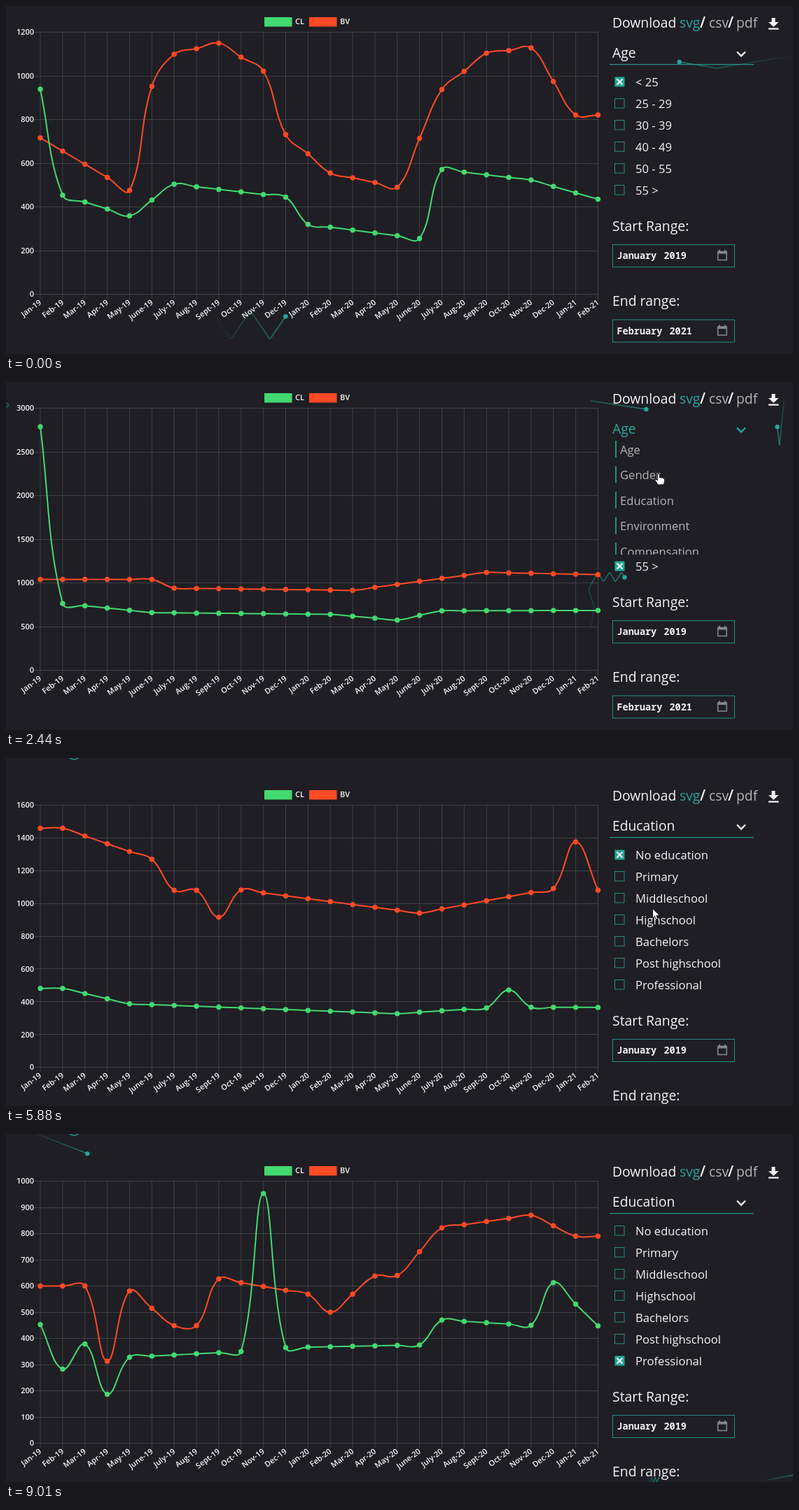
An HTML page with a canvas that plays this animation: 1124 by 498 pixels, repeating every 9.08 s.

```html
<!DOCTYPE html>
<html lang="en">
<head>
<meta charset="utf-8">
<title>Chart dashboard</title>
<style>
html, body { margin: 0; width: 100%; height: 100%; overflow: hidden; background: #1f1e24; }
canvas { display: block; }
</style>
</head>
<body>
<canvas id="stage" width="1124" height="498"></canvas>
<script>
const ctx = document.getElementById('stage').getContext('2d');
const LOOP = 9080, MORPH = 500, PLOT_H = 375, COUNT = 26;
const BG = '#1f1e24', TEAL = '#26a69a', EDGE = '#218f85', GREEN = '#43d970', RED = '#ff4a25';
const WHITE = '#f4f4f6', GREY = '#b4b4be', ICON = '#85858a';
const SANS = '"Open Sans", "Noto Sans", sans-serif', MONO = '"Noto Sans Mono", monospace';

const months = 'Jan Feb Mar Apr May June July Aug Sept Oct Nov Dec'.split(' ');
const labels = Array.from({ length: COUNT }, (_, i) => `${months[i % 12]}-${19 + Math.floor(i / 12)}`);
const groups = [
  { name: 'Age', options: ['< 25', '25 - 29', '30 - 39', '40 - 49', '50 - 55', '55 >'] },
  { name: 'Gender', options: ['Male', 'Female'] },
  { name: 'Education', options: ['No education', 'Primary', 'Middleschool', 'Highschool', 'Bachelors', 'Post highschool', 'Professional'] },
];
const menu = ['Age', 'Gender', 'Education', 'Environment', 'Compensation'];

const clamp = v => Math.max(0, Math.min(1, v));
const mix = (a, b, u) => a + (b - a) * u;

// Turning points (month: value), joined by straight runs and level at both ends.
function heights(turns, max) {
  const keys = Object.keys(turns).map(Number);
  return labels.map((_, i) => {
    const a = keys.findLast(k => k <= i) ?? keys[0], b = keys.find(k => k > i) ?? a;
    const u = b > a ? clamp((i - a) / (b - a)) : 0;
    return mix(turns[a], turns[b], u) / max * PLOT_H;
  });
}
const views = [];
const view = (time, group, option, max, step, bv, cl) =>
  views.push({ time, group, option, max, step, bv: heights(bv, max), cl: heights(cl, max) });

view(0, 0, 0, 1200, 200,
  { 0: 716, 4: 475, 5: 952, 6: 1099, 8: 1150, 10: 1022, 11: 731, 13: 555, 16: 490, 18: 938, 20: 1104, 22: 1128, 24: 821 },
  { 0: 939, 1: 454, 4: 359, 6: 504, 11: 445, 12: 320, 17: 255, 18: 571, 22: 523, 25: 435 });
view(600, 0, 2, 2500, 500,
  { 1: 1280, 4: 1132, 8: 1042, 14: 1045, 22: 1360, 25: 1275 },
  { 0: 2067, 1: 733, 4: 607, 13: 610, 16: 555, 18: 673, 25: 660 });
view(1500, 0, 5, 3000, 500,
  { 5: 1040, 6: 940, 14: 915, 20: 1120, 25: 1095 },
  { 0: 2788, 1: 765, 5: 660, 13: 640, 16: 575, 18: 680, 25: 685 });
view(2860, 1, 0, 4000, 500,
  { 1: 3250, 4: 2946, 5: 3104, 10: 2990, 13: 2741, 17: 2997, 18: 3264, 22: 3650, 25: 3430 },
  { 1: 2100, 4: 1712, 12: 1690, 16: 1395, 18: 1803, 21: 1773, 23: 1985, 25: 1760 });
view(3750, 1, 1, 3500, 500,
  { 1: 2700, 4: 2434, 5: 2680, 10: 2560, 11: 2329, 13: 2268, 16: 2550, 18: 3090, 22: 3320, 25: 3041 },
  { 1: 1780, 4: 1565, 8: 1600, 16: 1400, 18: 1932, 22: 1960, 25: 1661 });
view(5500, 2, 0, 1600, 200,
  { 1: 1460, 5: 1270, 6: 1080, 7: 1080, 8: 915, 9: 1082, 17: 940, 23: 1090, 24: 1376, 25: 1080 },
  { 1: 480, 4: 386, 16: 326, 20: 360, 21: 470, 22: 364 });
view(7650, 2, 6, 1000, 100,
  { 2: 600, 3: 313, 4: 581, 6: 449, 7: 449, 8: 627, 12: 569, 13: 500, 15: 638, 16: 640, 18: 822, 22: 870, 24: 790 },
  { 0: 453, 1: 283, 2: 379, 3: 187, 4: 328, 9: 350, 10: 953, 11: 365, 17: 375, 18: 470, 22: 450, 23: 613, 25: 448 });

const openSpans = [[2200, 2860], [4800, 5500]];
const cursorKeys = [
  [150, 1000, 510], [600, 880, 171], [1170, 915, 244], [1500, 878, 264], [2200, 948, 68], [2440, 932, 131],
  [2860, 932, 133], [3380, 911, 139], [3750, 879, 170], [4550, 954, 91], [5400, 925, 200], [6830, 919, 258],
  [7650, 878, 325], [8900, 925, 510],
];

// Worms: the head stands on corner `k` at time `t` and moves along the corners.
const worms = [];
function worm(t, speed, trail, k, ...xy) {
  const pts = [];
  for (let i = 0; i < xy.length; i += 2) {
    const p = { x: xy[i], y: xy[i + 1], d: 0 }, q = pts[pts.length - 1];
    if (q) p.d = q.d + Math.hypot(p.x - q.x, p.y - q.y);
    pts.push(p);
  }
  worms.push({ t, speed, trail, pts, start: pts[k].d, total: pts[pts.length - 1].d });
}
const zigzag = (x, dx, n, y1, y2, drift = 0) =>
  Array.from({ length: n }, (_, i) => [x + i * dx, (i % 2 ? y2 : y1) + i * drift]).flat();
const nook = (t, x, tip, y, h = 8) => worm(t, .1, 40, 2, x, y - h, tip, y, x, y + h);

worm(-91, .4315, 187, 4, ...zigzag(265.4, 27.9, 21, 477, 436));
worm(0, .3, 170, 2, 1130, 70, 1015, 89, 962, 80, 860, 95);
worm(1170, .2, 75, 2, 1066, 84, 1095, 89, 1130, 84);
worm(1170, .2, 60, 2, 830, -1, 853, 4, 880, -4);
worm(2440, .3, 200, 1, 835, 27, 914, 39, 980, 50);
worm(2392, .555, 140, 1, ...zigzag(1111, -6.3, 13, 28, 87, 4.25));
worm(2412, .3, 190, 7, 836, 350, 840, 322, 832, 297, ...zigzag(845, 8.5, 7, 272, 286));
worm(3380, .25, 190, 12, ...zigzag(1010, 9.2, 12, 319, 303), 1117, 313, 1132, 300);
worm(3380, .3, 170, 2, 235, 460, 333, 498, 387, 494, 440, 470);
worm(4550, .3, 160, 2, 845, 114, 925, 103, 994, 114, 1060, 104);
worm(4550, .39, 170, 13, ...zigzag(992, -2.1, 20, 58, 75));
worm(4550, .2, 85, 1, 715, 475, 795, 501);
worm(6830, .3, 180, 3, 843, 15, 832, 88, 840, 146, 835, 186, 845, 240);
worm(6830, .3, 150, 3, 315, 470, 357, 508, 405, 468, 437, 492, 470, 510);
worm(9010, .2, 90, 1, 40, -2, 116, 28, 190, 60);
worm(9010, .2, 60, 1, 1073, 498, 1130, 487);
worm(9010, .1, 60, 7, ...zigzag(914, 2.6, 8, 499, 491));
nook(2440, -5, 4, 33);
for (let y = 117; y < 230; y += 34.7) nook(4550, -5, 4, y);
nook(6830, 1130, 1118, 145, 15);
nook(6830, 1130, 1117, 269);

function text(str, x, y, size, color = WHITE, weight = 500, align = 'left', family = SANS) {
  ctx.font = `${weight} ${size}px ${family}`;
  ctx.fillStyle = color;
  ctx.textAlign = align;
  ctx.fillText(str, x, y + size * .355);
}
function rect(x, y, w, h, color) {
  ctx.fillStyle = color;
  ctx.fillRect(x, y, w, h);
}
function line(color, width, ...xy) {
  ctx.strokeStyle = color;
  ctx.lineWidth = width;
  ctx.beginPath();
  for (let i = 0; i < xy.length; i += 2) ctx.lineTo(xy[i], xy[i + 1]);
  ctx.stroke();
}
function frame(x, y, w, h, color, width = 1) {
  ctx.strokeStyle = color;
  ctx.lineWidth = width;
  ctx.strokeRect(x, y, w, h);
}
function dot(x, y, r, color) {
  ctx.fillStyle = color;
  ctx.beginPath();
  ctx.arc(x, y, r, 0, 7);
  ctx.fill();
}

function pointAt(pts, d) {
  const i = Math.max(1, pts.findIndex(p => p.d >= d));
  const a = pts[i - 1], b = pts[i], u = clamp((d - a.d) / (b.d - a.d));
  return [mix(a.x, b.x, u), mix(a.y, b.y, u)];
}
function drawWorm(w, t) {
  const head = w.start + (t - w.t) * w.speed, tail = head - w.trail, steps = 60;
  if (head <= 0 || tail >= w.total) return;
  for (let i = 0; i < steps; i++) {
    const a = Math.max(0, tail + w.trail * i / steps);
    const b = Math.min(w.total, tail + w.trail * (i + 1) / steps);
    if (b <= a) continue;
    ctx.globalAlpha = .75 * (i + 1) / steps;
    line(TEAL, 1.5, ...pointAt(w.pts, a), ...pointAt(w.pts, b));
  }
  ctx.globalAlpha = 1;
  if (head <= w.total) dot(...pointAt(w.pts, head), 3.2, TEAL);
}

const px = i => 49 + i * 31.86;

function drawSeries(h, base, color) {
  const p = h.map((v, i) => [px(i), base - v]);
  const fit = y => Math.max(base - PLOT_H, Math.min(base, y));
  const ctrl = p.map((c, i) => {
    const a = p[Math.max(0, i - 1)], b = p[Math.min(COUNT - 1, i + 1)];
    const da = Math.hypot(c[0] - a[0], c[1] - a[1]), db = Math.hypot(b[0] - c[0], b[1] - c[1]);
    const ka = .4 * da / (da + db), kb = .4 * db / (da + db), dx = b[0] - a[0], dy = b[1] - a[1];
    return { before: [c[0] - ka * dx, fit(c[1] - ka * dy)], after: [c[0] + kb * dx, fit(c[1] + kb * dy)] };
  });
  ctx.strokeStyle = color;
  ctx.lineWidth = 2;
  ctx.beginPath();
  ctx.moveTo(...p[0]);
  for (let i = 1; i < COUNT; i++) ctx.bezierCurveTo(...ctrl[i - 1].after, ...ctrl[i].before, ...p[i]);
  ctx.stroke();
  for (const [x, y] of p) dot(x, y, 3.7, color);
}

function drawChart(now, prev, t, top) {
  const base = top + 412.5, grid = 'rgba(255,255,255,.15)';
  rect(369, top + 16, 39.5, 13.5, GREEN);
  text('CL', 413, top + 22.5, 11, WHITE, 600);
  rect(433, top + 16, 39.5, 13.5, RED);
  text('BV', 477, top + 22.5, 11, WHITE, 600);
  for (let v = 0; v <= now.max; v += now.step) {
    const y = base - v / now.max * PLOT_H;
    line(grid, 1, 41, Math.floor(y) + .5, 846, Math.floor(y) + .5);
    text(String(v), 40, y, 11, WHITE, 600, 'right');
  }
  labels.forEach((label, i) => {
    line(grid, 1, px(i), base - PLOT_H, px(i), base + 7);
    ctx.save();
    ctx.translate(px(i), base + 10);
    ctx.rotate(-37 * Math.PI / 180);
    text(label, 0, 0, 11, WHITE, 600, 'right');
    ctx.restore();
  });
  const u = 1 - (1 - clamp((t - now.time) / MORPH)) ** 4;
  const blend = key => now[key].map((v, i) => prev ? mix(prev[key][i], v, u) : v);
  drawSeries(blend('bv'), base, RED);
  drawSeries(blend('cl'), base, GREEN);
}

function drawDate(title, month, year, yearX, y) {
  text(title, 866, y, 19.4);
  frame(866.5, y + 26.5, 174, 32, EDGE);
  text(month, 872.5, y + 42.5, 13.5, WHITE, 600, 'left', MONO);
  text(year, yearX, y + 42.5, 13.5, WHITE, 600, 'left', MONO);
  frame(1016.7, y + 36.5, 12.5, 12, ICON, 1.6);
  rect(1016, y + 36, 14, 3.5, ICON);
  rect(1018, y + 34, 2, 3, ICON);
  rect(1026, y + 34, 2, 3, ICON);
}

function drawPanel(now, top, open, hover) {
  const group = groups[now.group], y = top + 24;
  text('Download', 866, y, 19.3);
  text('svg', 962, y, 19.3, TEAL);
  text('/', 991, y, 21, WHITE, 600);
  text('csv', 1004, y, 19.3, GREY);
  text('/', 1031, y, 21, WHITE, 600);
  text('pdf', 1043, y, 19.3, GREY);
  rect(1093.5, y - 7, 5, 6, WHITE);
  ctx.beginPath();
  ctx.moveTo(1089, y - 1);
  ctx.lineTo(1103.5, y - 1);
  ctx.lineTo(1096.2, y + 6);
  ctx.fill();
  rect(1089, y + 7.5, 14.5, 2.2, WHITE);

  group.options.forEach((option, i) => {
    const cy = top + 109 + i * 31;
    if (i === now.option) {
      rect(869.5, cy - 7.5, 14, 14, TEAL);
      line(WHITE, 2, 872.5, cy - 4.5, 880.5, cy + 3.5);
      line(WHITE, 2, 880.5, cy - 4.5, 872.5, cy + 3.5);
    } else frame(869.5, cy - 7.5, 13.5, 13.5, EDGE);
    text(option, 899, cy, 16.6);
  });
  const below = top + 109 + group.options.length * 31 + 20;
  drawDate('Start Range:', 'January', '2019', 939.5, below);
  drawDate('End range:', 'February', '2021', 947.5, below + 107.5);

  const tint = open ? TEAL : hover ? '#6cbfb4' : WHITE;
  text(group.name, 866, top + 67, 19.3, tint);
  line(tint, 2.4, 1044, top + 65.5, 1050, top + 71.5, 1056, top + 65.5);
  if (!open) {
    rect(862, top + 83, 206, 1.3, EDGE);
    return;
  }
  ctx.save();
  ctx.beginPath();
  ctx.rect(862, top + 84, 206, 163);
  ctx.clip();
  rect(862, top + 84, 206, 163, BG);
  menu.forEach((item, i) => {
    const cy = top + 97 + i * 36.5;
    rect(870, cy - 13, 2, 24, EDGE);
    text(item, 877, cy, 16.6, GREY);
  });
  ctx.restore();
}

function cursorAt(t) {
  const i = cursorKeys.findIndex(k => k[0] > t);
  if (i < 1) return null;
  const [t0, x0, y0] = cursorKeys[i - 1], [t1, x1, y1] = cursorKeys[i];
  const u = (t - t0) / (t1 - t0), e = u * u * (3 - 2 * u);
  return { x: mix(x0, x1, e), y: mix(y0, y1, e) };
}
const arrow = new Path2D('M0 0V14L3.2 11L5.4 16L7.6 15L5.5 10.3H10Z');
const hand = new Path2D('M-1.5 1Q0 -1 1.5 1V6Q3 4.5 4 6.3Q6 5 6.7 7Q8.7 6.3 8.7 9V12L7 16H-1L-5 9.5Q-5 7.5 -3 8.5L-1.5 10Z');
function drawCursor(c, pointing) {
  const shape = pointing ? hand : arrow;
  ctx.save();
  ctx.translate(c.x, c.y);
  ctx.fillStyle = '#fff';
  ctx.strokeStyle = '#111';
  ctx.lineWidth = 1;
  ctx.fill(shape);
  ctx.stroke(shape);
  ctx.restore();
}

function draw() {
  const t = performance.now() % LOOP;
  const n = views.findLastIndex(v => v.time <= t), now = views[n];
  const top = now.group ? 30 : 0;
  const open = openSpans.some(([a, b]) => t >= a && t < b);
  const cursor = cursorAt(t);
  const inside = cursor && cursor.x > 866 && cursor.x < 1068;
  const hover = inside && Math.abs(cursor.y - top - 67) < 15;
  const onRow = inside && groups[now.group].options.some((_, i) => Math.abs(cursor.y - top - 109 - i * 31) < 10);

  rect(0, 0, 1124, 498, BG);
  for (const w of worms) drawWorm(w, t);
  if (top) {
    ctx.strokeStyle = TEAL;
    ctx.lineWidth = 1.3;
    ctx.beginPath();
    ctx.arc(97, -9, 11, 0, 7);
    ctx.stroke();
  }
  drawChart(now, views[n - 1], t, top);
  drawPanel(now, top, open, hover);
  if (cursor) drawCursor(cursor, open || hover || onRow);
  requestAnimationFrame(draw);
}
draw();
</script>
</body>
</html>
```
